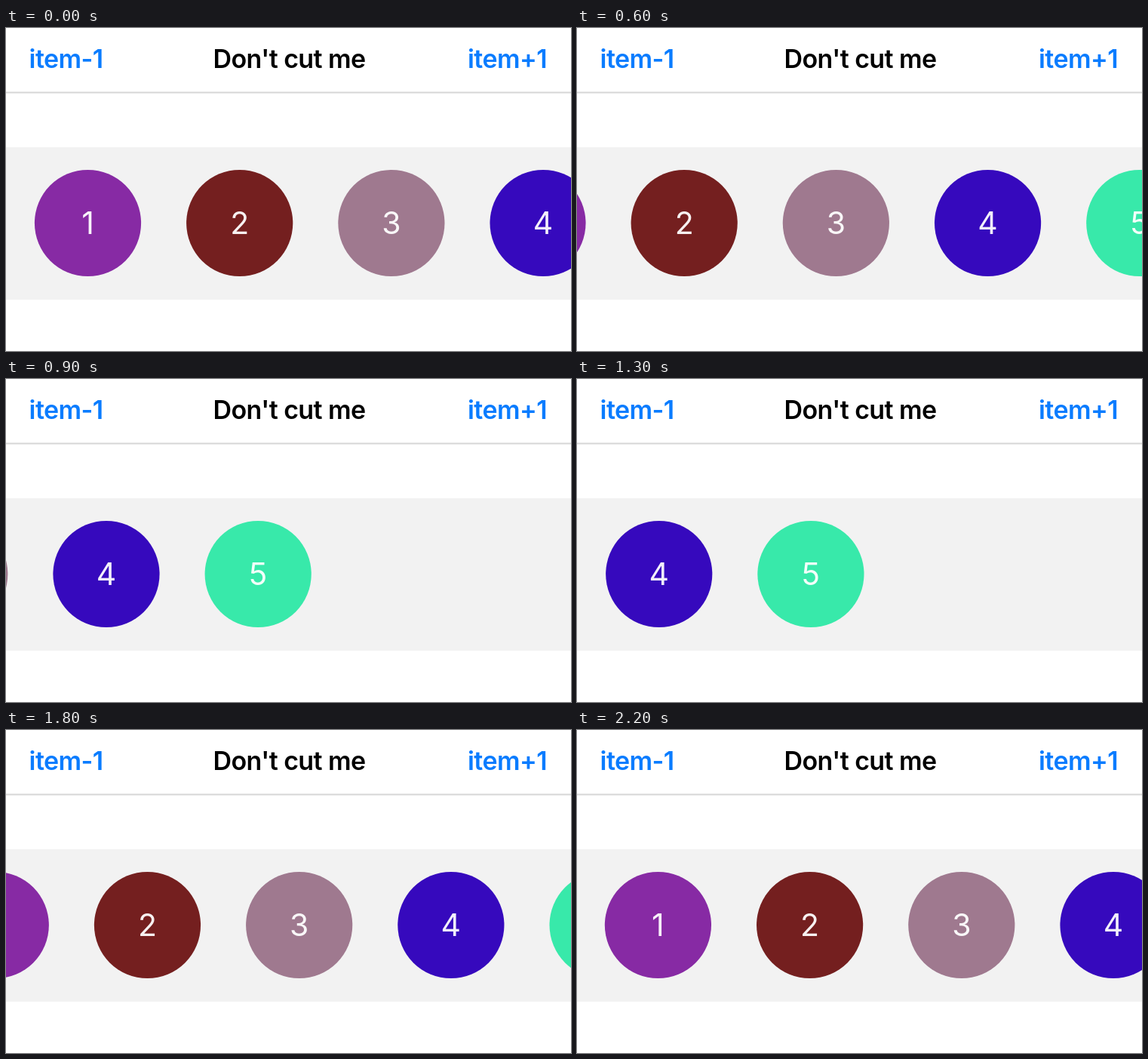
An HTML page for the animation above (2.3 s loop, 749x428 px).

```html
<!DOCTYPE html>
<html lang="en">
<head>
<meta charset="utf-8">
<title>Snapping list</title>
<style>
  html, body { margin: 0; width: 100%; height: 100%; overflow: hidden; background: #fff; }
  svg { display: block; }
  text { font-family: Inter, Roboto, "Liberation Sans", sans-serif; font-optical-sizing: none; }
  .bar text { font-size: 34px; font-weight: 600; letter-spacing: -0.6px; }
  .link { fill: #0a7cff; }
  .end { text-anchor: end; }
  .mid, .list text { text-anchor: middle; }
  .list text { font-size: 41px; font-weight: 400; fill: #fff; fill-opacity: .94; }
</style>
</head>
<body>
<svg width="749" height="428" viewBox="0 0 749 428">
  <g class="bar">
    <rect y="84.5" width="749" height="2" fill="#d6d6d6"/>
    <text class="link" x="30.6" y="52.6">item-1</text>
    <text class="mid" x="375.5" y="52.6">Don't cut me</text>
    <text class="link end" x="717" y="52.6">item+1</text>
  </g>
  <rect y="158" width="749" height="202" fill="#f2f2f2"/>
  <g class="list"></g>
</svg>
<script>
  const LOOP = 2300, TICK = 100;
  const PITCH = 201.2, FIRST = 108.5, MID_Y = 258.5, RADIUS = 70.6;
  const colors = ['#872aa4', '#741f1f', '#9f798f', '#3609bd', '#38e9aa'];
  const list = document.querySelector('.list');

  function add(tag, attrs, label = '') {
    const el = document.createElementNS('http://www.w3.org/2000/svg', tag);
    for (const key in attrs) el.setAttribute(key, attrs[key]);
    el.textContent = label;
    list.append(el);
  }

  colors.forEach((fill, i) => {
    const x = FIRST + i * PITCH;
    add('circle', { cx: x, cy: MID_Y, r: RADIUS, fill });
    add('text', { x, y: 273.3 }, i + 1);
  });

  // Critically damped spring from 0 to 1; rate is per second.
  function spring(ms, rate) {
    const x = Math.max(0, ms) / 1000 * rate;
    return 1 - (1 + x) * Math.exp(-x);
  }

  // Scroll three items forward, then back.
  const scrollAt = t => 3 * PITCH * (spring(t - 521.5, 13.2) - spring(t - 1587.3, 14));

  const start = performance.now();

  function draw(now) {
    const time = Math.max(0, now - start) % LOOP;
    const tick = Math.floor(time / TICK) * TICK;
    list.setAttribute('transform', `translate(${-scrollAt(tick)} 0)`);
    requestAnimationFrame(draw);
  }
  draw(start);
</script>
</body>
</html>
```
